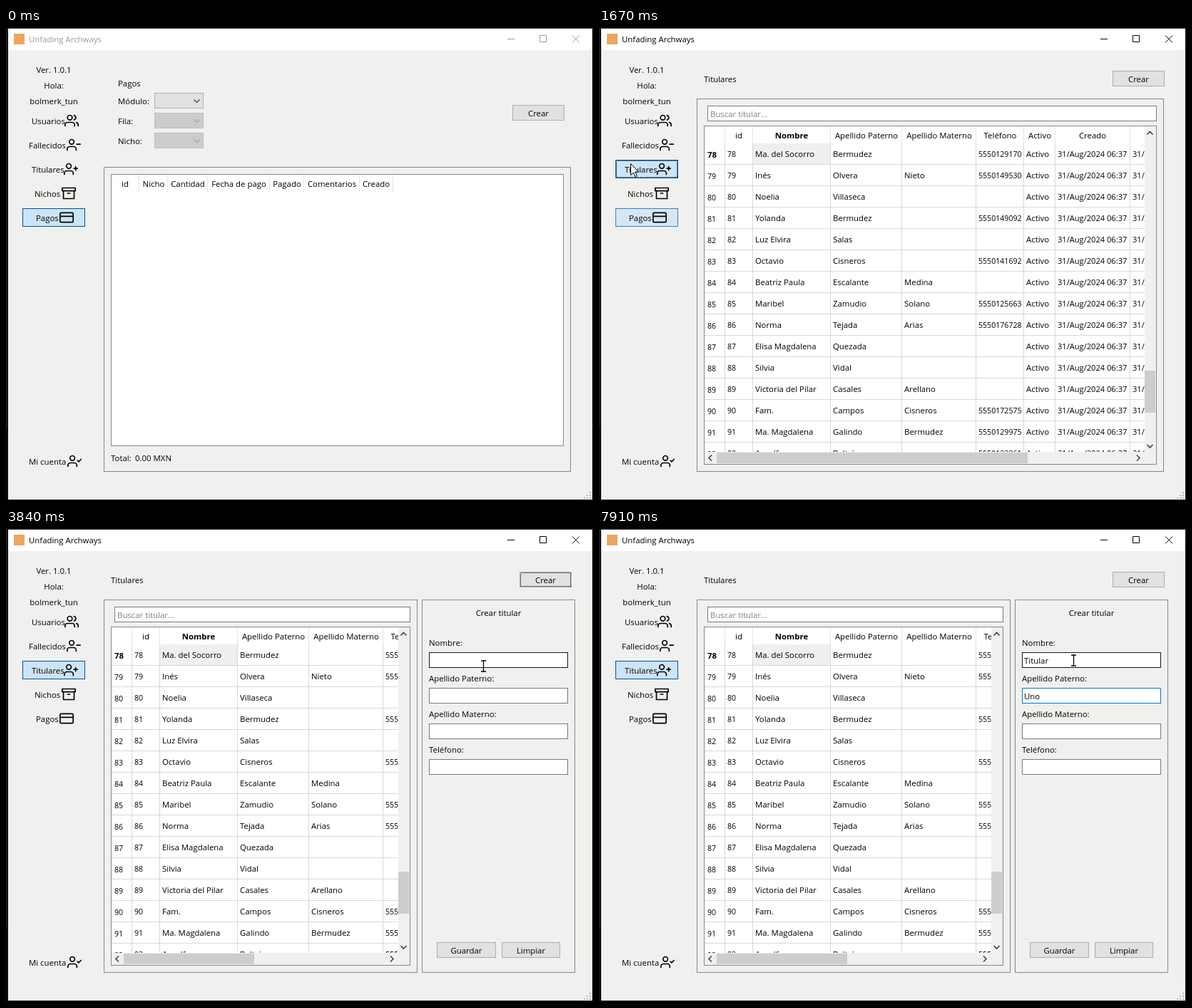
These frames come from a looping animation (823 px wide and 664 px high, 8 s). An HTML page:

```html
<!DOCTYPE html>
<html lang="es">
<head>
<meta charset="utf-8">
<title>Titulares</title>
<style>
  html, body { margin: 0; width: 100%; height: 100%; overflow: hidden; background: #0c0c0c; }
  svg { display: block; }
  text { font: 11.4px "Open Sans", "Noto Sans", sans-serif; white-space: pre; }
  text.bold { font-weight: 700; }
  text.date { font-size: 11.1px; }
  text.num { font-size: 10.6px; }
  rect { shape-rendering: crispEdges; }
  .icon { fill: none; stroke: #000; stroke-width: 2; stroke-linecap: round; stroke-linejoin: round; }
  .icon rect { shape-rendering: auto; }
</style>
</head>
<body>
<svg id="stage" width="823" height="664" viewBox="0 0 823 664"></svg>
<script>
const LOOP = 8000;
const GRAY = '#e1e1e1', EDGE = '#adadad', FRAME = '#828790', FIELD = '#7a7a7a';
const BLUE = '#0078d7', DOWN = '#cce4f7', DOWN_EDGE = '#005499', BACK = '#f0f0ee';

// Markup helpers; text is placed by its vertical centre.
const fillRect = (x, y, w, h, fill, more = '') =>
  `<rect x="${x}" y="${y}" width="${w}" height="${h}" fill="${fill}" ${more}/>`;
const box = (x, y, w, h, fill, stroke, more = '') =>
  fillRect(x + .5, y + .5, w - 1, h - 1, fill, `stroke="${stroke}" ${more}`);
const label = (s, x, y, more = '') => `<text x="${x}" y="${y + 4}" ${more}>${s}</text>`;
const centred = (s, x, y, more = '') => label(s, x, y, `text-anchor="middle" ${more}`);
const line = (d, stroke = '#505050', width = 1.2) =>
  `<path d="${d}" fill="none" stroke="${stroke}" stroke-width="${width}"/>`;
const chevron = (x, y, turn = 0, stroke, width) =>
  `<g transform="translate(${x} ${y}) rotate(${turn})">${line('M-4-2L0 2L4-2', stroke, width)}</g>`;
const button = (s, x, y, w) => box(x, y, w, 22, GRAY, EDGE) + centred(s, x + w / 2, y + 11.5);
const focusRing = (id, x, y, w, h) =>
  box(x, y, w, h, 'none', '#000', `id="${id}" stroke-dasharray="1 1"`);
const group = (id, content) => `<g id="${id}">${content}</g>`;

const torso = '<path d="M16 21v-2a4 4 0 0 0-4-4H5a4 4 0 0 0-4 4v2"/><circle cx="8.5" cy="7" r="4"/>';
const icons = {
  people: '<path d="M17 21v-2a4 4 0 0 0-4-4H5a4 4 0 0 0-4 4v2M23 21v-2a4 4 0 0 0-3-3.87M16 3.13a4 4 0 0 1 0 7.75"/><circle cx="9" cy="7" r="4"/>',
  minus: torso + '<path d="M17 11h6"/>',
  plus: torso + '<path d="M17 11h6M20 8v6"/>',
  check: torso + '<path d="M17 11l2 2 4-4"/>',
  archive: '<path d="M21 8v13H3V8M10 12h4"/><rect x="1" y="3" width="22" height="5"/>',
  card: '<rect x="1" y="4" width="22" height="16" rx="2"/><path d="M1 10h22"/>'
};

const menu = [
  ['Usuarios', 36, 82, 130, 'people'], ['Fallecidos', 32, 85, 164, 'minus'],
  ['Titulares', 36, 81, 198, 'plus'], ['Nichos', 40, 78, 232, 'archive'],
  ['Pagos', 42, 75, 266, 'card'], ['Mi cuenta', 32, 86, 608, 'check']
];

function sidebar() {
  const items = menu.map(([name, x, iconX, y, icon]) => label(name, x, y + .5) +
    `<g class="icon" transform="translate(${iconX} ${y - 10}) scale(.8333)">${icons[icon]}</g>`);
  return centred('Ver. 1.0.1', 67, 59) + centred('Hola:', 67, 81) + centred('bolmerk_tun', 67, 103) +
    box(23, 185, 88, 26, DOWN, DOWN_EDGE, 'id="ownersButton"') +
    focusRing('ownersFocus', 24, 186, 86, 24) +
    box(23, 253, 88, 26, DOWN, DOWN_EDGE, 'id="paysButton"') + items.join('');
}

function windowFrame() {
  let grip = '';
  for (let r = 0; r < 3; r++)
    for (let c = 0; c <= r; c++) grip += fillRect(818 - c * 4, 651 + r * 4, 2, 2, '#b8b8b8');
  return fillRect(0, 0, 823, 1, '#3c3c3c') + fillRect(0, 0, 2, 560, '#1c1c1c') +
    fillRect(3, 1, 819, 661, BACK) + fillRect(3, 1, 819, 30, '#fff') +
    fillRect(11, 8, 15, 15, '#eca65f') +
    group('caption', label('Unfading Archways', 32, 16, 'fill="currentColor"') +
      line('M703 15.5h10M748.5 10.5h9v9h-9zM794 10.5l10 10M804 10.5l-10 10', 'currentColor', 1)) + grip;
}

function paymentsPage() {
  const combo = (name, y, off) => label(name, 157, y + 12) +
    box(208, y, 69, 22, off ? '#ccc' : GRAY, off ? '#bfbfbf' : EDGE) +
    chevron(267.5, y + 11.5, 0, off ? '#a0a0a0' : '#404040');
  const heads = [['id', 167, 186], ['Nicho', 207, 226], ['Cantidad', 255, 282], ['Fecha de pago', 326.5, 369],
    ['Pagado', 394, 417], ['Comentarios', 457, 495], ['Creado', 519, 542]];
  return label('Pagos', 157, 78) + combo('Módulo:', 91) + combo('Fila:', 119, true) +
    combo('Nicho:', 147, true) + button('Crear', 710, 108, 73) +
    box(137, 195, 655, 428, 'none', FRAME) + box(147, 205, 635, 382, '#fff', FRAME) +
    heads.map(([s, x, edge]) => centred(s, x, 219) + fillRect(edge, 206, 1, 25, '#e5e5e5')).join('') +
    label('Total:', 147, 604) + label('0.00 MXN', 181, 604);
}

// First name, two surnames and the end of the phone number, from id 78 on.
const people = `Ma. del Socorro,Bermudez,,29170
Inés,Olvera,Nieto,49530
Noelia,Villaseca,,
Yolanda,Bermudez,,49092
Luz Elvira,Salas,,
Octavio,Cisneros,,41692
Beatriz Paula,Escalante,Medina,
Maribel,Zamudio,Solano,25663
Norma,Tejada,Arias,76728
Elisa Magdalena,Quezada,,
Silvia,Vidal,,
Victoria del Pilar,Casales,Arellano,
Fam.,Campos,Cisneros,72575
Ma. Magdalena,Galindo,Bermudez,29975
Arnulfo,Beltrán,,32861`.split('\n').map(row => row.split(','));

const heads = [['id', 196], ['Nombre', 270], ['Apellido Paterno', 375], ['Apellido Materno', 477],
  ['Teléfono', 562.5], ['Activo', 618], ['Creado', 692]];

function tableBody() {
  let out = heads.map(([s, x]) => centred(s, x, 151, s === 'Nombre' ? 'class="bold"' : '')).join('');
  out += fillRect(216, 162, 108, 29, '#efefef');
  for (const x of [176, 215, 324, 424, 528, 595, 639, 744])
    out += fillRect(x, 138, 1, 24, '#e5e5e5') + fillRect(x, 162, 1, 440, '#d8d8d8');
  const date = '31/Aug/2024 06:37';
  people.forEach(([name, father, mother, phone], i) => {
    const y = 177 + i * 30, id = 78 + i;
    out += label(id, 152, y + 1, i ? 'class="num"' : 'class="bold"') + label(id, 180, y, 'class="num"') +
      label(name, 219, y) + label(father, 328, y) + label(mother, 428, y) +
      label(phone && '55501' + phone, 532, y, 'class="num"') + label('Activo', 599, y) +
      label(date, 643, y, 'class="date"') + label(date, 748, y, 'class="date"') +
      fillRect(148, y + 14, 617, 1, '#d8d8d8');
  });
  return out;
}

function listing(right, thumbEnd) {
  const bar = right - 17;
  return box(137, 99, right - 127, 524, 'none', FRAME) + box(152, 109, right - 152, 22, '#fff', FIELD) +
    label('Buscar titular...', 156, 121, 'fill="#808080"') +
    box(147, 137, right - 147, 476, '#fff', FRAME) +
    `<svg x="148" y="138" width="${bar - 148}" height="457"><g transform="translate(-148 -138)">${tableBody()}</g></svg>` +
    fillRect(bar, 138, 16, 474, BACK) + fillRect(148, 595, right - 149, 17, BACK) +
    fillRect(bar, 481, 15, 59, '#cdcdcd') + fillRect(165, 596, thumbEnd - 165, 15, '#cdcdcd') +
    chevron(bar + 7.5, 147.5, 180, '#404040', 1.6) + chevron(bar + 7.5, 587, 0, '#404040', 1.6) +
    chevron(156, 603.5, 90, '#404040', 1.6) + chevron(bar - 9, 603.5, -90, '#404040', 1.6);
}

function formPanel() {
  const names = ['Nombre:', 'Apellido Paterno:', 'Apellido Materno:', 'Teléfono:'];
  return box(583, 99, 215, 524, 'none', FRAME) + centred('Crear titular', 690.5, 118) +
    names.map((s, i) => label(s, 593, 160 + i * 50) +
      box(593, 173 + i * 50, 195, 22, '#fff', FIELD, `id="field${i}"`)).join('') +
    label('', 596, 184.5, 'id="typed0"') + label('', 596, 234.5, 'id="typed1"') +
    fillRect(596, 176, 1, 16, '#000', 'id="caret"') +
    button('Guardar', 604, 580, 83) + button('Limpiar', 695, 580, 82);
}

const stage = document.getElementById('stage');
stage.innerHTML = windowFrame() + sidebar() + group('payments', paymentsPage()) +
  group('owners', label('Titulares', 147, 72) + box(720, 60, 73, 22, GRAY, EDGE, 'id="createButton"') +
    focusRing('createFocus', 721, 61, 71, 20) + centred('Crear', 756.5, 71.5)) +
  group('wide', listing(782, 601)) + group('narrow', listing(567, 348)) + group('form', formPanel()) +
  group('arrow', '<path d="M.5.5V16.5L4.2 13L6.8 18.6L9.2 17.5L6.7 12H11.6Z" fill="#fff" stroke="#000"/>') +
  group('beam', line('M-3.5-7.5h3l.5.5l.5-.5h3M0-7V7M-3.5 7.5h3l.5-.5l.5.5h3', '#000', 1.3));

const $ = {};
stage.querySelectorAll('[id]').forEach(el => $[el.id] = el);
const show = (id, on) => $[id].setAttribute('visibility', on ? 'visible' : 'hidden');
const paint = (id, fill, stroke) => {
  $[id].setAttribute('fill', fill);
  $[id].setAttribute('stroke', stroke);
};
const ramp = (t, from, length) => Math.min(1, Math.max(0, (t - from) / length));
const mix = (a, b, k) => 'rgb(' + [1, 3, 5].map(i => {
  const [p, q] = [a, b].map(c => parseInt(c.slice(i, i + 2), 16));
  return Math.round(p + (q - p) * k);
}) + ')';

// Pointer path: time, x, y
const path = [
  [70, 666, 540], [420, 320, 262], [690, 84, 156], [830, 57, 151], [900, 52, 153], [1100, 40, 174],
  [1310, 44, 190], [1740, 44, 190], [2000, 400, 80], [2220, 680, 32], [2430, 728, 64], [2570, 734, 75],
  [2800, 740, 70], [3060, 740, 70], [3200, 734, 82], [3480, 700, 150], [3700, 674, 200],
  [3910, 665, 184], [LOOP, 665, 184]
];
function pointerAt(t) {
  const i = Math.max(1, path.findIndex(p => p[0] >= t));
  const [t0, x0, y0] = path[i - 1], [t1, x1, y1] = path[i];
  const k = ramp(t, t0, t1 - t0);
  return [Math.round(x0 + (x1 - x0) * k), Math.round(y0 + (y1 - y0) * k)];
}

const typing = [
  { word: 'Titular', times: [5510, 5710, 5810, 5910, 6110, 6210, 6310] },
  { word: 'Uno', times: [6900, 7100, 7300] }
];
const caretSwitches = [[3980, 1], [4520, 0], [5050, 1], [7910, 0]];

function render(t) {
  const tick = Math.floor((t + 3) / 69.3) * 69.3;
  const active = t >= 1460, second = t >= 1600, form = t >= 2980;

  $.caption.setAttribute('color', active ? '#000' : '#999');
  show('payments', !second);
  show('owners', second);
  show('wide', second && !form);
  show('narrow', form);
  show('form', form);

  show('ownersButton', active);
  show('ownersFocus', active && t < 2910);
  const fade = ramp(tick, 1590, 280);
  show('paysButton', fade < 1);
  paint('paysButton', mix(DOWN, BACK, fade), mix(DOWN_EDGE, BACK, fade));

  const hover = ramp(tick, 2430, 280), leave = ramp(tick, 3180, 300);
  if (t < 2910) paint('createButton', mix(GRAY, '#e5f1fb', hover), mix(EDGE, BLUE, hover));
  else paint('createButton', mix(DOWN, GRAY, leave), mix(DOWN_EDGE, EDGE, leave));
  show('createFocus', t >= 2910 && t < 3980);

  const [x, y] = pointerAt(tick);
  const overField = form && y >= 173 && y < 195;
  show('arrow', t >= 70 && !overField);
  show('beam', overField);
  $.arrow.setAttribute('transform', `translate(${x} ${y})`);
  $.beam.setAttribute('transform', `translate(${x + .5} ${y + .5})`);

  const focus = t < 3980 ? -1 : t < 6570 ? 0 : 1;
  typing.forEach(({ word, times }, i) => {
    $['typed' + i].textContent = word.slice(0, times.filter(at => at <= t).length);
    const edge = focus === i ? BLUE : i === 0 && overField ? '#171717' : FIELD;
    $['field' + i].setAttribute('stroke', edge);
  });

  const lit = caretSwitches.reduce((on, [at, next]) => t >= at ? next : on, 0);
  show('caret', lit);
  if (lit) {
    const field = $['typed' + focus];
    const advance = field.textContent ? field.getComputedTextLength() : 0;
    $.caret.setAttribute('x', 596 + Math.round(advance));
    $.caret.setAttribute('y', 176 + focus * 50);
  }
}

const start = performance.now();
function frame() {
  render((performance.now() - start) % LOOP);
  requestAnimationFrame(frame);
}
frame();
</script>
</body>
</html>
```
